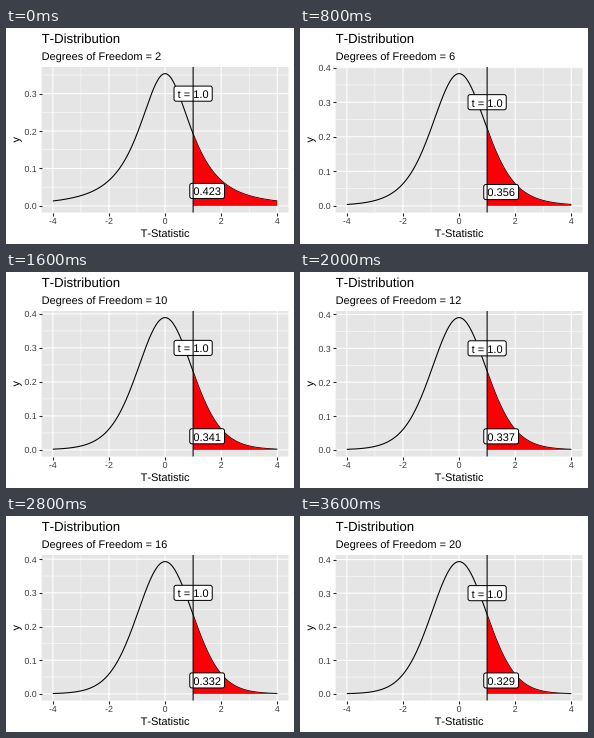
Recreate the animation shown at these times as a matplotlib script. Size 288 px wide and 216 px high, loop 4 s.

```python
import math

import matplotlib.pyplot as plt
import numpy as np
from matplotlib.animation import FuncAnimation
from matplotlib.patches import FancyBboxPatch, PathPatch
from matplotlib.textpath import TextPath
from matplotlib.transforms import Affine2D

plt.rcParams["text.kerning_factor"] = 6  # plain advances, no kerning

W, H, DPI = 288, 216, 72
LEFT, RIGHT, TOP, BOTTOM = 35.64, 282.5, 39, 184.5
T = 1.0
LINE = 1.07
GREY = "#3c3c3c"
DFS = range(2, 21, 2)


def density(x, df):
    c = math.gamma((df + 1) / 2) / (math.sqrt(df * math.pi) * math.gamma(df / 2))
    return c * (1 + x * x / df) ** (-(df + 1) / 2)


def two_tailed(t, df):
    """Two-sided p-value; closed form for an even df."""
    theta = math.atan(t / math.sqrt(df))
    term = total = 1.0
    for k in range(1, df // 2):
        term *= (2 * k - 1) / (2 * k) * math.cos(theta) ** 2
        total += term
    return 1 - math.sin(theta) * total


fig = plt.figure(figsize=(W / DPI, H / DPI), dpi=DPI, facecolor="white")

# Panel with the plot
ax = fig.add_axes([LEFT / W, 1 - BOTTOM / H, (RIGHT - LEFT) / W, (BOTTOM - TOP) / H],
                  facecolor="#e5e5e5")
for spine in ax.spines.values():
    spine.set_visible(False)
ax.patch.set_snap(False)
ax.set_axisbelow(True)
ax.set_xlim(-4.4, 4.4)
ax.set_xticks(range(-4, 5, 2))
ax.set_xticks(range(-3, 4, 2), minor=True)
ax.tick_params(length=2.75, width=LINE, color="#262626",
               labelbottom=False, labelleft=False)
ax.tick_params(which="minor", length=0)
ax.grid(which="major", color="white", lw=LINE, snap=False)
ax.grid(which="minor", color="white", lw=LINE / 2, snap=False)

# Overlay measured in pixels
stage = fig.add_axes([0, 0, 1, 1], zorder=2)
stage.set_xlim(0, W)
stage.set_ylim(H, 0)
stage.axis("off")


def px(t):
    return LEFT + (t + 4.4) / 8.8 * (RIGHT - LEFT)


def py(y):
    low, high = ax.get_ylim()
    return BOTTOM - (y - low) / (high - low) * (BOTTOM - TOP)


def snap(y):
    """Baselines sit on whole pixels."""
    return math.ceil(y - 0.1)


class Words:
    """Outlined text with sub-pixel horizontal placement."""

    def __init__(self, size, color="black", center=False, angle=0):
        self.size, self.center, self.angle = size, center, angle
        self.patch = stage.add_patch(PathPatch(
            TextPath((0, 0), "0", size=size), fc=color, lw=0, zorder=4))

    def put(self, text, x, y):
        path = TextPath((0, 0), text, size=self.size,
                        prop={"family": "Liberation Sans"})
        shift = 0
        if self.center:
            box = path.get_extents()
            shift = -(box.x0 + box.x1) / 2
        move = (Affine2D().translate(shift, 0).rotate_deg(self.angle)
                .scale(1, -1).translate(x, y))
        self.patch.set_path(path.transformed(move))
        return self


class Label:
    """Rounded white box with text, tied to a point of the plot."""

    height, pad = 15.1, 3.6

    def __init__(self, x, y, width):
        self.y, self.left = y, px(x) - width / 2
        self.box = stage.add_patch(FancyBboxPatch(
            (self.left, 0), width, self.height,
            boxstyle="round,pad=0,rounding_size=2.16",
            fc="white", ec="black", lw=1, zorder=2))
        self.words = Words(11.04)

    def put(self, text):
        mid = py(self.y)
        self.box.set_y(mid - self.height / 2)
        self.words.put(text, self.left + self.pad, snap(mid + 3.96))


Words(13.2).put("T-Distribution", LEFT, 15)
subtitle = Words(11)
Words(11, center=True).put("T-Statistic", px(0), 209)
Words(11, center=True, angle=90).put("y", 13.4, (TOP + BOTTOM) / 2)
for t in range(-4, 5, 2):
    Words(8.8, GREY, center=True).put(str(t), px(t), 196)
y_labels = [Words(8.8, GREY) for _ in range(5)]

stage.plot([px(T)] * 2, [TOP, BOTTOM], color="black", lw=LINE, snap=False,
           solid_capstyle="butt", zorder=3)
t_label = Label(T, 0.3, 38.2)
p_label = Label(1.5, 0.04, 34.8)

# The shaded tail covers the lower half of the curve's stroke
xs = np.linspace(-4, 4, 201)
tail = np.linspace(T, 4, 101)
curve, = ax.plot([], [], color="black", lw=LINE, solid_capstyle="butt", zorder=2)
area, = ax.fill([T, 4, 4], [0, 0, 0], color="#fb0007", lw=0, zorder=3)


def update(i):
    df = DFS[i]
    peak = density(0, df)
    low, high = -0.05 * peak, 1.05 * peak
    ticks = [k / 10 for k in range(5)]
    ax.set_yticks([y for y in ticks if y < high])
    ax.set_yticks([y + 0.05 for y in ticks[:-1]], minor=True)
    ax.set_ylim(low, high)
    for words, y in zip(y_labels, ticks):
        words.put(f"{y:.1f}", LEFT - 17.18, snap(py(y) + 3.16))
        words.patch.set_visible(y < high)

    curve.set_data(xs, density(xs, df))
    area.set_xy(np.column_stack([np.r_[T, tail, 4], np.r_[0, density(tail, df), 0]]))
    subtitle.put(f"Degrees of Freedom = {df}", LEFT, 32)
    t_label.put(f"t = {T:.1f}")
    p_label.put(f"{two_tailed(T, df):.3f}")
    return []


anim = FuncAnimation(fig, update, frames=len(DFS), interval=400,
                     repeat=True, repeat_delay=0, blit=False)
plt.show()
```
